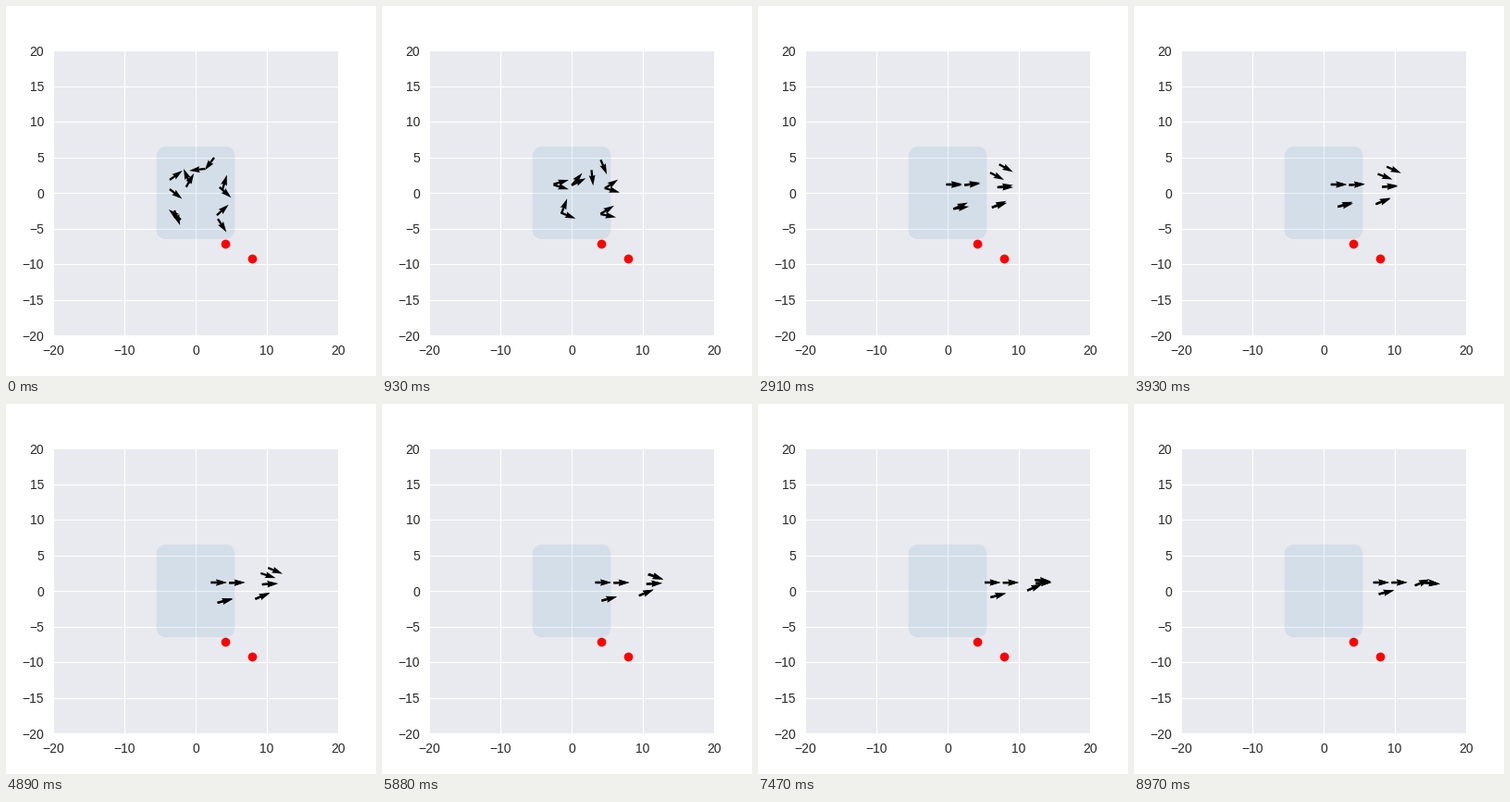
Recreate the animation shown at these times as a matplotlib script. Size 400 by 400 pixels, loop 9000 ms.

```python
import numpy as np
import matplotlib.pyplot as plt
from matplotlib.animation import FuncAnimation
from matplotlib.patches import FancyBboxPatch

plt.rcParams.update({
    "font.family": ["Liberation Sans"],
    "font.size": 10,
    "axes.facecolor": "#E9EAEF",
    "axes.linewidth": 0,
    "axes.grid": True,
    "axes.axisbelow": True,
    "grid.color": "white",
    "grid.linewidth": 0.8,
    "xtick.color": ".15",
    "ytick.color": ".15",
    "xtick.major.size": 0,
    "ytick.major.size": 0,
    "xtick.major.pad": 7,
    "ytick.major.pad": 7,
})

FRAMES, STEP_MS = 300, 30
SPEED = 0.0355      # cruising speed, units per step
TURN = 37           # steps for a heading to settle by a factor e
MERGE = 12          # the same for the gap between partners
BEND = 50           # steps a late turn takes
LATE_HEADING = -5


def relax(start, end, t, tau):
    return end + (start - end) * np.exp(-t / tau)


def heading(start, cruise, t, bend=None):
    """Settle on the cruise heading, then ease to the late one if bending."""
    angle = relax(start, cruise, t, TURN)
    if bend is not None:
        s = np.clip((t - bend) / BEND, 0, 1)
        angle += (LATE_HEADING - angle) * s * s * (3 - 2 * s)
    return angle


def pair(centre, gap, starts, cruise, bend=None):
    """Two arrows that close up and fly on along one straight line."""
    centre, gap = np.array(centre), np.array(gap)
    a = np.radians(cruise)
    velocity = SPEED * np.array([np.cos(a), np.sin(a)])

    def at(t):
        mid = centre + velocity * t
        half = relax(gap, 0, t, MERGE)
        return [(*(mid + side * half), heading(start, cruise, t, bend))
                for side, start in zip((1, -1), starts)]
    return at


def leader(way, start, cruise):
    """One arrow on a path of (step, x, y) points that ends in JOIN."""
    steps, xs, ys = zip(*way, *JOIN)

    def at(t):
        return [(np.interp(t, steps, xs), np.interp(t, steps, ys),
                 heading(start, cruise, t, JOIN[0][0]))]
    return at


JOIN = [(200, 10.91, 2.27), (250, 12.27, 1.52), (299, 14.03, 1.19)]

FLOCK = [
    pair((-3.64, 1.17), (0, 0.65), (36, -38), 0),
    pair((-1.08, 1.07), (0.26, 0.26), (113, 60), 0.5),
    leader([(0, 1.3, 3.38)], -173, -16),
    leader([(0, 2.6, 4.94), (155, 10, 3.44)], -127, -21),
    pair((3.55, 0.6), (-0.2, 0.2), (-42, 73), 3, bend=250),
    pair((3.05, -3.4), (-0.07, 0.26), (42, -57), 23),
    pair((-2.53, -3.12), (0.45, -0.65), (140, -69), 14.5),
]


def pose(t):
    x, y, deg = np.array([arrow for part in FLOCK for arrow in part(t)]).T
    a = np.radians(deg)
    return np.column_stack([x, y]), np.cos(a), np.sin(a)


fig, ax = plt.subplots(figsize=(4, 4), dpi=100, facecolor="white")
fig.subplots_adjust(left=0.125, right=0.9, bottom=0.11, top=0.88)
ax.set_aspect("equal")
ax.set(xlim=(-20, 20), ylim=(-20, 20),
       xticks=range(-20, 21, 10), yticks=range(-20, 21, 5))

ax.add_patch(FancyBboxPatch((-5.5, -6.5), 11, 13,
                            boxstyle="round,pad=0,rounding_size=1.4",
                            fc="tab:blue", ec="none", alpha=0.1))
ax.plot([4.2, 7.93], [-7.15, -9.2], "o", color="red", ms=7, mew=0)

tails, u, v = pose(0)
arrows = ax.quiver(*tails.T, u, v, color="black",
                   scale=18, width=0.0075, zorder=3)


def update(i):
    tails, u, v = pose(i)
    arrows.set_offsets(tails)
    arrows.set_UVC(u, v)
    return (arrows,)


anim = FuncAnimation(fig, update, frames=FRAMES, interval=STEP_MS,
                     repeat=True, repeat_delay=0, blit=False)
plt.show()
```
